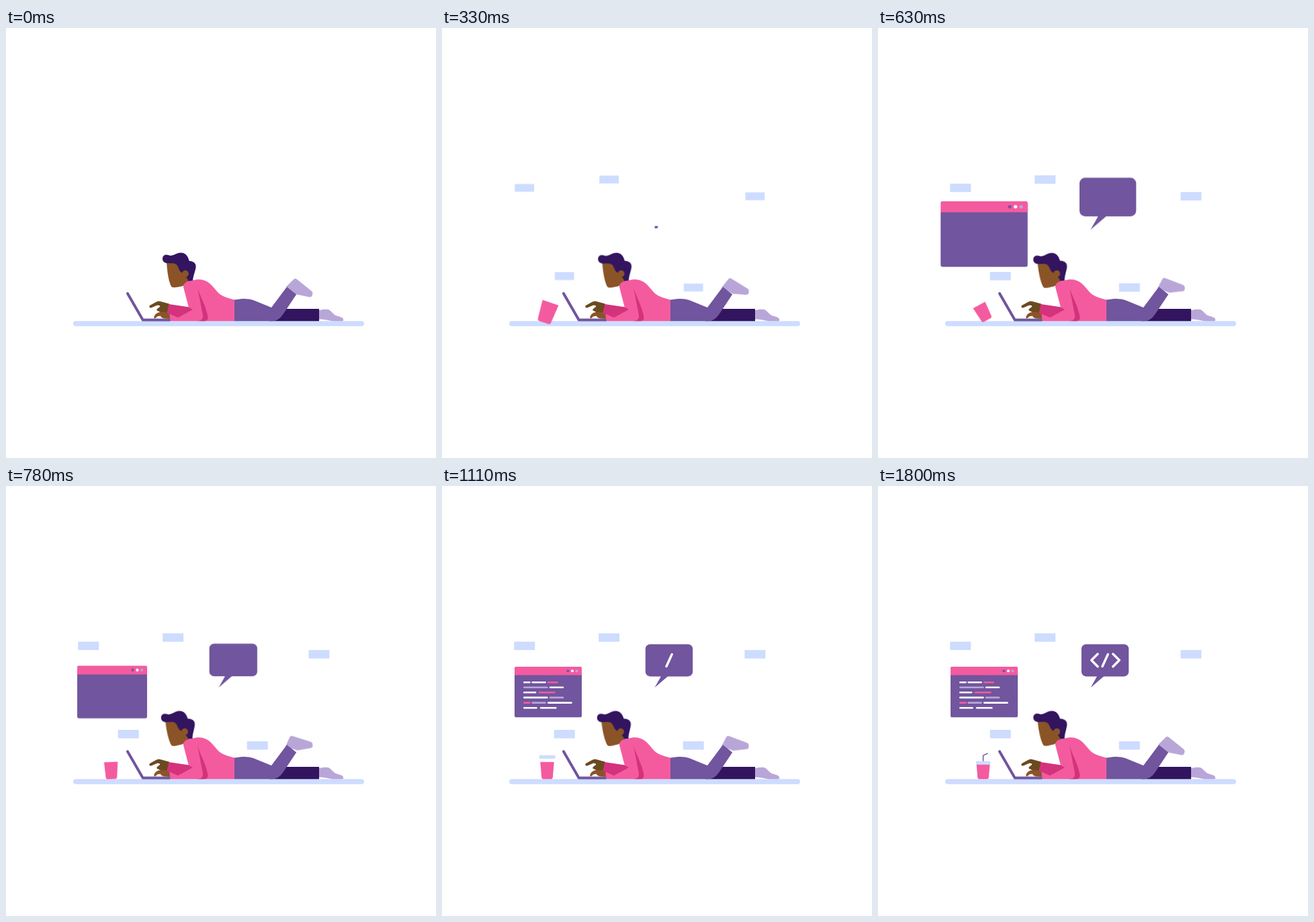
Animation, 640 px wide and 640 px high, one loop 2.73 s. Source, as an HTML page:

```html
<!DOCTYPE html>
<html lang="en">
<head>
<meta charset="utf-8">
<title>Coding on the floor</title>
<style>
  html, body { margin: 0; width: 100%; height: 100%; overflow: hidden; background: #fff; }
  svg { display: block; width: 100vw; height: 100vh; }

  .purple { fill: #71559e; }
  .dark { fill: #33145f; }
  .lilac { fill: #b9a6d8; }
  .pink { fill: #f45b9f; }
  .rose { fill: #d4327c; }
  .blue { fill: #cddcff; }
  .skin { fill: #8a5426; }
  .shade { fill: #6b4a20; }
  .line { fill: none; stroke: #71559e; stroke-linecap: round; stroke-linejoin: round; }

  /* Every part shares one 2730 ms cycle. */
  .anim {
    animation: 2730ms cubic-bezier(.33, 0, .67, 1) infinite both;
  }

  .tile { animation-name: tile; animation-timing-function: cubic-bezier(.33, 0, .37, 1); transform-box: fill-box; transform-origin: center; }
  @keyframes tile { 0% { transform: scale(0); } 16.48%, 100% { transform: none; } }

  .window { animation-name: window; transform-origin: 158px 306.5px; }
  @keyframes window {
    0%, 12.09% { transform: scale(0); animation-timing-function: cubic-bezier(.33, 0, .37, 1); }
    21.98% { transform: scale(1.31); }
    30.5%, 100% { transform: scale(1); }
  }

  .bubble { animation-name: bubble; transform-origin: 317.5px 299px; }
  @keyframes bubble {
    0%, 10.7% { transform: scale(0); animation-timing-function: cubic-bezier(.33, 0, .37, 1); }
    21.98% { transform: scale(1.21); }
    29.8%, 100% { transform: scale(1); }
  }

  .turn { animation-name: turn; transform-origin: 156.5px 423.5px; }
  @keyframes turn {
    0%, 4.4% { transform: rotate(0deg); }
    12.09% { transform: rotate(18.7deg); }
    23.08% { transform: rotate(-28.5deg); }
    29.67%, 100% { transform: rotate(0deg); }
  }
  .grow { animation-name: grow; transform-origin: 156.5px 423.5px; }
  @keyframes grow {
    0%, 4.4% { transform: scale(0); }
    12.09% { transform: scale(1.23); }
    20.88%, 100% { transform: scale(1); }
  }

  .lid { animation-name: lid; transform-origin: 156.5px 412px; }
  @keyframes lid {
    0%, 32.97% { transform: translateY(-8.7px) scale(0); }
    39.56%, 41.76% { transform: translateY(-8.7px) scale(1.12, 1); }
    49.45%, 100% { transform: translateY(0) scale(1); }
  }

  .straw { animation-name: straw; stroke-dasharray: 1 2; stroke-linecap: butt; }
  @keyframes straw {
    0%, 54.95% { stroke-dashoffset: 1.02; }
    63.74%, 100% { stroke-dashoffset: 0; }
  }

  /* Row delays only spill over while the window is still hidden. */
  .row { animation-name: row; animation-delay: calc(var(--i) * 30ms); transform-origin: 121px 0; }
  .row path { fill: none; stroke: #fff; stroke-width: 2.6; stroke-linecap: round; }
  .row .p { stroke: #f45b9f; }
  .row .l { stroke: #b9a6d8; }
  @keyframes row {
    0%, 30.04% { transform: scaleX(0); }
    34.8%, 100% { transform: scaleX(1); }
  }

  .code { stroke: #fff; stroke-width: 3.4; transform-origin: 338.2px 259.5px; }
  .slash { animation-name: slash; }
  .angles { animation-name: angles; animation-timing-function: cubic-bezier(.33, 0, .37, 1); }
  @keyframes slash {
    0%, 30.77% { transform: scale(0); }
    39.56%, 100% { transform: scale(1); }
  }
  @keyframes angles {
    0%, 41.76% { transform: scale(0); }
    53.85%, 100% { transform: scale(1); }
  }

  .head { animation-name: head; transform-origin: 265px 383px; }
  @keyframes head {
    0% { transform: rotate(0deg); }
    31.87% { transform: rotate(-3.3deg); }
    65.93%, 100% { transform: rotate(-2.6deg); }
  }

  .foot { animation-name: foot; transform-origin: 425px 390px; }
  @keyframes foot {
    0% { transform: rotate(0deg); }
    31.87% { transform: rotate(-22deg); }
    65.93%, 100% { transform: rotate(0deg); }
  }
</style>
</head>
<body>
<svg viewBox="0 0 640 640">
  <g class="blue">
    <rect class="anim tile" x="107.3" y="231.7" width="31" height="12.5"/>
    <rect class="anim tile" x="233.2" y="219.3" width="31" height="12.5"/>
    <rect class="anim tile" x="450.4" y="244.2" width="31" height="12.5"/>
    <rect class="anim tile" x="166.7" y="363" width="31" height="12.5"/>
    <rect class="anim tile" x="358.7" y="380" width="31" height="12.5"/>
    <rect x="100" y="436.3" width="433" height="7.4" rx="3.7"/>
  </g>

  <g class="anim window">
    <rect class="purple" x="108" y="269" width="100" height="75.3" rx="2.6"/>
    <path class="pink" d="M108 281.5V271.6Q108 269 110.6 269H205.4Q208 269 208 271.6V281.5Z"/>
    <circle class="purple" cx="187.4" cy="275.2" r="2"/>
    <circle fill="#fff" cx="194" cy="275.2" r="2"/>
    <circle class="lilac" cx="200.5" cy="275.2" r="2"/>
    <g class="anim row" style="--i:0"><path d="M122.3 292.2H130.5M134.7 292.2H153.6"/><path class="p" d="M158.2 292.2H171.5"/></g>
    <g class="anim row" style="--i:1"><path class="l" d="M122.3 299.7H156.4"/><path d="M161 299.7H180"/></g>
    <g class="anim row" style="--i:2"><path d="M122.3 307.3H139"/><path class="p" d="M144.8 307.3H167.4"/></g>
    <g class="anim row" style="--i:3"><path d="M122.3 314.9H156.4"/><path class="l" d="M161 314.9H180"/></g>
    <g class="anim row" style="--i:4"><path class="p" d="M122.3 322.6H130.5"/><path class="l" d="M134.7 322.6H153.6"/><path d="M158.2 322.6H192.5"/></g>
    <g class="anim row" style="--i:5"><path d="M122.3 330.2H140.5M147 330.2H169.4"/></g>
  </g>

  <g class="anim bubble">
    <rect class="purple" x="302.8" y="235.4" width="70.4" height="48" rx="7"/>
    <path class="purple" d="M326.7 282L316.6 300L337.6 282Z"/>
    <path class="anim line code slash" d="M342.2 250.5L334 268.5"/>
    <path class="anim line code angles" d="M327 250L317.7 259.3L327 268.8M349.8 250L359.2 259.3L349.8 268.8"/>
  </g>

  <path class="anim line straw" pathLength="1" stroke-width="1.5" d="M156.5 411V401.2L163.5 397.8"/>
  <g class="anim turn">
    <path class="anim pink grow" d="M146.3 410.8H166.8L164.9 433.5Q164.6 436.3 162 436.3H151Q148.4 436.3 148.2 433.5Z"/>
  </g>
  <rect class="anim blue lid" x="145.9" y="409.6" width="21.4" height="5.2" rx=".8"/>

  <path class="line" stroke-width="4" d="M181 395.2L203.7 434.5H244"/>

  <path class="dark" d="M392 436.3L411 418H466V436.3Z"/>
  <path class="lilac" d="M466 420C474 418.4 479 418.2 482 420.2C486 423.5 488 427 493 428.6C499 430.6 502 431 502.2 434.4Q502.2 436.3 500 436.3H488C480 436 474 432.5 466 433.6Z"/>
  <path class="anim lilac foot" d="M417 385L428.2 374Q430.5 371.8 433 374L454.8 391.5Q457 393.6 456.2 396.2L455.4 398.8Q454.5 400.9 451.8 400.4L432 396.6Z"/>
  <path class="purple" d="M340 404.6C352 402.2 361 402.6 368 405L395 416L418 385.3L432.2 396.4L412.5 426Q405.5 436.3 396 436.3H340Z"/>

  <path class="shade" d="M243 410.5L230 407Q227 405.6 223 408L214 413Q212 416.6 216 416.6L225.5 412.6L229 413.2Q229.8 415.2 227 416.5Q223.4 418.3 224.6 420.6L231 423.5L240 425.5Z"/>
  <path class="skin" d="M245 423.5L235 422.8Q226 422 222.5 426Q219.3 430 220.6 432Q222.8 432.8 225.2 429.2L230 428.6Q230.5 431 235 432.3L245 433Z"/>

  <g class="anim head">
    <path class="skin" d="M239 347L257 347L268 360L274 377L265 383Q262 385 258 385C254 386 251 386.6 247 385.8C242.8 381 239.8 364 239 347Z"/>
    <path class="dark" d="M233 343.5C233 337.8 238 336.4 242.5 338.2C248.5 340.5 252 335 260 334.6C267 334.3 271 339.5 272.5 346.4C279.5 347.2 283.4 350.3 282.5 356.5C281.5 363 278.3 369 278 377H271L267 371L262 364.2Q258.5 363 256.6 357Q254.8 350.6 249 350.2L240.5 350C236 350 233 347.5 233 343.5Z"/>
    <circle class="skin" cx="267" cy="365.7" r="4.9"/>
    <path class="skin" d="M263 367L268 370L272 377L266 378Z"/>
  </g>

  <path class="rose" d="M242.6 411L273 415.5L280 419L257 433L239.4 424Z"/>
  <path class="pink" d="M264 385.5C264 379 270 376.2 277 376C286 372.5 296 374 303 380C311.5 387.5 314 394.5 322 398.5C329 402 335 403 340 404.6V436.3H247Q244.3 436.3 244 433L243.4 425.6L256 431L278 419L271.8 415.4Z"/>
  <path class="rose" d="M285 386C288 398 298.5 415 300.5 430.5Q300.6 436.3 295 436.3H284C291 436 294 432.5 292.8 427Z"/>
</svg>
</body>
</html>
```
